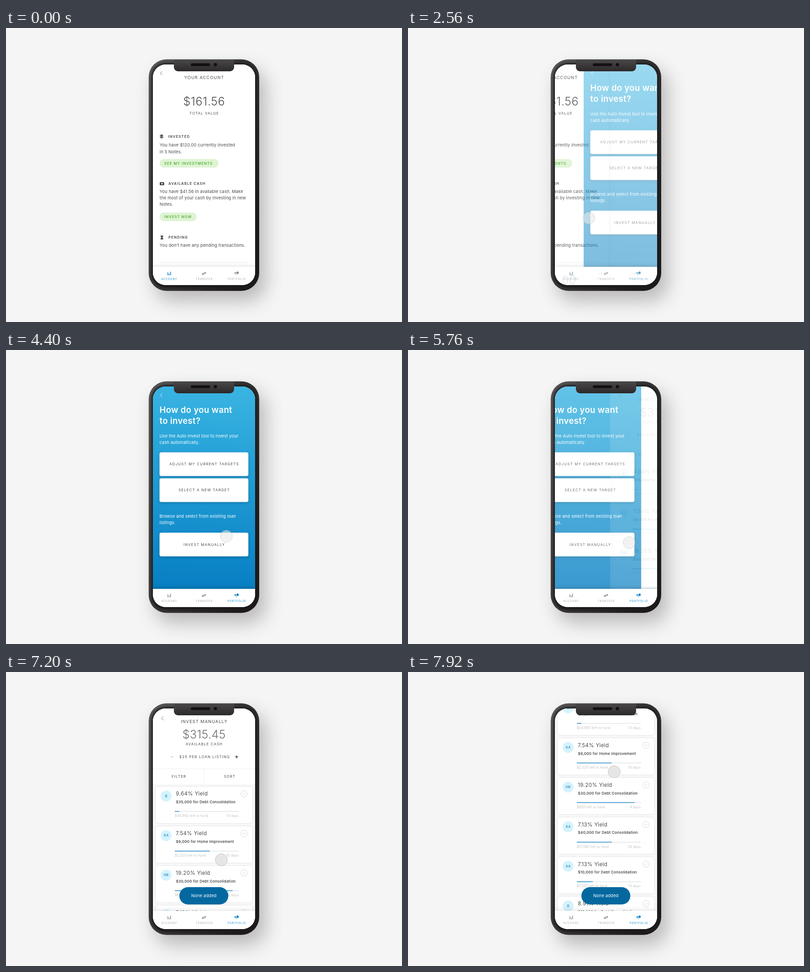
These frames come from a looping animation (868 by 645 pixels, 8000 ms). An HTML page:

```html
<!DOCTYPE html>
<html lang="en">
<head>
<meta charset="utf-8">
<title>Invest flow</title>
<style>
  html, body { margin: 0; width: 100%; height: 100%; overflow: hidden; background: #f5f5f5; }
  svg { display: block; width: 868px; height: 645px; font-family: Inter, Roboto, sans-serif; }
  .chevron { fill: none; stroke-width: .9; }
  .button { fill: #fff; filter: drop-shadow(0 2px 3px rgba(0,0,0,.2)); }
  .sheet { filter: drop-shadow(0 0 5px rgba(0,0,0,.1)); }
  .bar { fill: #fff; filter: drop-shadow(0 -2px 4px rgba(0,0,0,.11)); }
</style>
</head>
<body>
<svg viewBox="0 0 868 645">
  <defs>
    <linearGradient id="body" x2="1" y2=".7">
      <stop stop-color="#5b595a"/><stop offset=".55" stop-color="#373536"/><stop offset="1" stop-color="#1d1b1c"/>
    </linearGradient>
    <linearGradient id="notch" x2="0" y2="1">
      <stop stop-color="#4b4849"/><stop offset="1" stop-color="#2c292a"/>
    </linearGradient>
    <linearGradient id="sky" gradientUnits="userSpaceOnUse" x1="445" y1="80" x2="425" y2="524">
      <stop stop-color="#39b4e2"/><stop offset=".5" stop-color="#1e9ad3"/><stop offset="1" stop-color="#077fc3"/>
    </linearGradient>
    <clipPath id="outer"><rect x="312.8" y="68.7" width="242.2" height="508" rx="39"/></clipPath>
    <clipPath id="screen"><rect x="322" y="80" width="224" height="484" rx="28"/></clipPath>
  </defs>
  <rect width="868" height="645" fill="#f5f5f5"/>
  <rect x="326.5" y="90.5" width="242.5" height="508" rx="38" fill="#383232" opacity=".31" style="filter:blur(20px)"/>
  <g clip-path="url(#outer)">
    <rect x="312" y="68" width="244" height="510" fill="url(#body)"/>
    <rect x="319" y="77" width="230" height="493" rx="31" fill="#1c1a1b" style="filter:blur(2.5px)"/>
  </g>
  <g clip-path="url(#screen)">
    <rect x="322" y="80" width="224" height="484" fill="#fff"/>
    <g id="account"></g>
    <g id="choose"></g>
    <g id="manual"><g id="list"></g><g id="added"></g></g>
    <g id="navAccount"></g>
    <g id="navPortfolio"></g>
  </g>
  <path d="M368 69H500V86a9 9 0 0 1-9 9H377a9 9 0 0 1-9-9Z" fill="url(#notch)"/>
  <rect x="405" y="77.5" width="42.5" height="6" rx="3" fill="#121011"/>
  <circle cx="459" cy="80.3" r="3.6" fill="#121011"/>
  <circle id="cursor" r="13.3"/>
</svg>
<script>
const $ = id => document.getElementById(id);

// size, weight, letter spacing, colour
const styles = {
  title: [9.3, 400, 1, '#4a4a4a'],
  amount: [25, 300, .75, '#4a4a4a'],
  faint: [25, 300, .75, '#8a8a8a'],
  cash: [25, 300, .45, '#6c6c6c'],
  caps: [7.8, 400, 1.2, '#4a4a4a'],
  label: [7.8, 400, 1.13, '#4a4a4a'],
  section: [7.8, 600, 1.1, '#444'],
  pill: [7.8, 600, 1.03, '#55b03a'],
  copy: [9.35, 400, .14, '#4a4a4a'],
  light: [9.35, 400, .14, '#fff'],
  hero: [18.5, 600, .35, '#fff'],
  yield: [11.5, 400, .4, '#4a4a4a'],
  loan: [8.2, 500, .25, '#333'],
  note: [7, 400, .35, '#bbb'],
  badge: [7.2, 500, .5, '#1a80b4']
};

function text(x, y, str, style, anchor = 'start') {
  const [size, weight, gap, fill] = Array.isArray(style) ? style : styles[style];
  const shift = { start: 0, middle: gap / 2, end: gap }[anchor];
  return `<text x="${x + shift}" y="${y}" font-size="${size}" font-weight="${weight}" letter-spacing="${gap}" fill="${fill}" text-anchor="${anchor}">${str}</text>`;
}
const mid = (y, str, style, x = 434) => text(x, y, str, style, 'middle');
const rect = (x, y, w, h, fill, r = 0, more = '') =>
  `<rect x="${x}" y="${y}" width="${w}" height="${h}" rx="${r}" fill="${fill}" ${more}/>`;
const circle = (x, y, r, fill, more = '') => `<circle cx="${x}" cy="${y}" r="${r}" fill="${fill}" ${more}/>`;
const path = (d, fill, more = '') => `<path d="${d}" fill="${fill}" ${more}/>`;
const chevron = (x, y, s, color) =>
  `<path class="chevron" stroke="${color}" d="M${x + s / 2} ${y - s}l${-s} ${s} ${s} ${s}"/>`;

function nav(active) {
  const color = i => i === active ? '#0b86c8' : '#8c8c8c';
  const label = (x, str, i) => mid(553.3, str, [5.5, 400, 1.05, i === active ? '#0b86c8' : '#a4a4a4'], x);
  return rect(322, 524, 224, 40, '#fff', 0, 'class="bar"')
    + path('M354 536h1.5v6.5h-1.5zM357 538.8h1.5v3.7h-1.5zM360 534.8h1.5v7.7h-1.5z', color(0))
    + path('M432.5 536.7h3.2v-2l3.3 2.7-3.3 2.7v-2h-3.2zM435 539h-2.8v-2l-3.3 2.7 3.3 2.7v-2h2.8z', color(1))
    + circle(507.5, 537, 2.7, color(2)) + circle(502.4, 537.5, 1.7, color(2)) + circle(504.5, 541, .9, color(2))
    + label(357.5, 'ACCOUNT', 0) + label(434, 'TRANSFER', 1) + label(505.5, 'PORTFOLIO', 2);
}

const pill = (y, w, str) => rect(336.5, y, w, 18.8, '#def4d3', 9.4) + text(346.8, y + 12.3, str, 'pill');
const lines = (x, y, step, style, ...rows) => rows.map((row, i) => text(x, y + i * step, row, style)).join('');

$('account').innerHTML =
  rect(322, 80, 224, 484, '#fff', 24, 'class="sheet"')
  + chevron(340.3, 99.3, 4, '#555')
  + mid(112, 'YOUR ACCOUNT', 'title') + mid(170, '$161.56', 'amount') + mid(189.6, 'TOTAL VALUE', 'label')
  + [5, 2.5, 0].map(d => path(`M341 ${233.2 + d}l4.8 2.2-4.8 2.2-4.8-2.2z`, '#444', 'stroke="#fff" stroke-width=".5"')).join('')
  + text(355.5, 240.8, 'INVESTED', 'section')
  + lines(336.8, 260.2, 14.3, 'copy', 'You have $120.00 currently invested', 'in 5 Notes.')
  + pill(287.4, 129.3, 'SEE MY INVESTMENTS')
  + rect(337, 338.3, 9.6, 6.6, '#444', .8) + circle(341.8, 341.6, 1.7, '#fff')
  + text(356, 344.4, 'AVAILABLE CASH', 'section')
  + lines(336.8, 361.7, 14.3, 'copy', 'You have $41.56 in available cash. Make', 'the most of your cash by investing in new', 'Notes.')
  + pill(405, 81.5, 'INVEST NOW')
  + path('M338.5 455.4h6.4v1.4h-.7q0 1.8-1.6 2.8 1.6 1 1.6 2.8h.7v1.4h-6.4v-1.4h.7q0-1.8 1.6-2.8-1.6-1-1.6-2.8h-.7z', '#444')
  + text(356, 462, 'PENDING', 'section')
  + text(336.8, 479.6, 'You don’t have any pending transactions.', 'copy')
  + rect(337, 513.5, 194, 1, '#eee')
  + mid(562, '$0.00', 'faint', 439);

const choice = (y, str) => rect(336.5, y, 194.7, 52, '#fff', 4, 'class="button"') + mid(y + 28.8, str, 'caps');
$('choose').innerHTML =
  rect(322, 80, 224, 484, 'url(#sky)')
  + chevron(340.3, 99.3, 4, '#fff')
  + lines(336.5, 138, 23.6, 'hero', 'How do you want', 'to invest?')
  + lines(336.5, 192.2, 14, 'light', 'Use the Auto Invest tool to invest your', 'cash automatically.')
  + choice(224.5, 'ADJUST MY CURRENT TARGETS') + choice(281.5, 'SELECT A NEW TARGET')
  + lines(336.5, 368.3, 14, 'light', 'Browse and select from existing loan', 'listings.')
  + choice(400.7, 'INVEST MANUALLY')
  + nav(2);

const debt = 'Debt Consolidation';
// grade, yield, amount, purpose, left, days, funded share
const loans = [
  ['B', '9.64', '35,000', debt, '34,950', 13, .07],
  ['AA', '7.54', '9,000', 'Home Improvement', '2,025', 10, .546],
  ['HR', '19.20', '30,000', debt, '650', 9, .905],
  ['AA', '7.13', '40,000', debt, '17,560', 29, .546],
  ['AA', '7.13', '10,000', debt, '7,550', 13, .25],
  ['B', '8.91', '10,000', debt, '4,300', 12, .5]
];
const card = ([grade, rate, amount, purpose, left, days, share], i) =>
  `<g transform="translate(0 ${i * 86.9})">`
  + rect(327.5, 250.7, 213, 81.6, '#fff', 7, 'stroke="#e4e4e4"')
  + circle(351, 272, 12, '#d5f3fd') + mid(274.6, grade, 'badge', 351)
  + text(372.3, 271.3, `${rate}% Yield`, 'yield')
  + text(372.5, 288, `$${amount} for ${purpose}`, 'loan')
  + rect(370, 305.2, 140, 1.5, '#e0e5e8') + rect(370, 305.2, 140 * share, 1.5, '#2b8cc6')
  + text(370, 318.2, `$${left} left to fund`, 'note') + text(510, 318.2, `${days} days`, 'note', 'end')
  + circle(521.6, 267.2, 7, 'none', 'stroke="#d8d8d8"')
  + path('M519 267.4l1.8 1.7 3.3-3.7', 'none', 'stroke="#ccc"')
  + '</g>';

$('list').innerHTML =
  rect(322, 80, 224, 720, '#f8f8f8', 24)
  + path('M322 246V104a24 24 0 0 1 24-24H522a24 24 0 0 1 24 24V246Z', '#fff')
  + chevron(343, 101.7, 4.3, '#666')
  + mid(112, 'INVEST MANUALLY', 'title') + mid(145.8, '$315.45', 'cash') + mid(160.7, 'AVAILABLE CASH', 'label')
  + rect(360.3, 185.6, 6.2, 1, '#aaa') + mid(189, '$25 PER LOAN LISTING', 'caps', 435)
  + path('M502 186.2h7M505.5 182.7v7', 'none', 'stroke="#333" stroke-width="1.3"')
  + rect(322, 212, 224, 1, '#eee') + rect(433.7, 212, 1, 34, '#eee')
  + mid(231.8, 'FILTER', 'caps', 378.5) + mid(231.8, 'SORT', 'caps', 489.7)
  + loans.map(card).join('');
$('added').innerHTML = rect(380, 472, 107.3, 38, '#04689f', 19) + mid(494.4, 'None added', 'light', 433.6);

$('navAccount').innerHTML = nav(0);
$('navPortfolio').innerHTML = nav(2);

const span = (t, from, to) => Math.min(1, Math.max(0, (t - from) / (to - from)));
const easeOut = u => 1 - (1 - u) ** 3;
const easeInOut = u => u < .5 ? 2 * u * u : 1 - 2 * (1 - u) ** 2;

// start, end, then four Bézier points
const moves = [
  [40, 560, [759, 55], [637, 201], [516, 348], [394, 494]],
  [960, 1840, [394, 494], [403, 470], [403, 440], [396, 417]],
  [3640, 4680, [396, 417], [420, 385], [490, 384], [485, 422.5]],
  [6800, 7000, [485, 422.5], [481, 419], [476, 415], [472, 412]],
  [7360, 7920, [472, 412], [465, 347.5], [459, 283], [452, 218.7]]
];
const presses = [[2160, 2480], [5040, 5760], [7200, 8000]];

function cursorAt(t) {
  const [from, to, a, b, c, d] = moves.findLast(m => t >= m[0]) || moves[0];
  const u = easeInOut(span(t, from, to)), v = 1 - u;
  return [0, 1].map(k => v ** 3 * a[k] + 3 * v * v * u * b[k] + 3 * v * u * u * c[k] + u ** 3 * d[k]);
}

function place(id, opacity, x, y = 0) {
  const node = $(id);
  node.style.display = opacity > 0 ? '' : 'none';
  node.setAttribute('opacity', opacity);
  node.setAttribute('transform', `translate(${x} ${y})`);
}

function draw(now) {
  const t = now % 8000;
  const first = easeOut(span(t, 2460, 2860));
  const second = easeOut(span(t, 5720, 6320));
  const rise = easeInOut(span(t, 5720, 6320));
  const fadeIn = p => p ** 1.25;

  place('account', first < 1 ? 1 - .2 * first : 0, -182 * first);
  place('choose', fadeIn(first) * Math.max(0, 1 - 1.1 * second), 151 * (1 - first) - 182 * second);
  place('manual', fadeIn(second), 150 * (1 - second));
  place('list', 1, 0, -193.3 * easeInOut(span(t, 7360, 7920)));
  place('added', 1, 0, 50 * (1 - rise));
  place('navAccount', 1 - first, 0);
  place('navPortfolio', first, 0);

  const [x, y] = cursorAt(t);
  const pressed = presses.some(([from, to]) => t >= from && t < to);
  place('cursor', t < 80 ? 0 : 1, x, y);
  $('cursor').setAttribute('fill', pressed ? 'rgba(229,229,229,.95)' : 'rgba(232,232,232,.58)');
  $('cursor').setAttribute('stroke', pressed ? '#c6c6c6' : 'rgba(0,0,0,.12)');
  requestAnimationFrame(draw);
}
requestAnimationFrame(draw);
</script>
</body>
</html>
```
